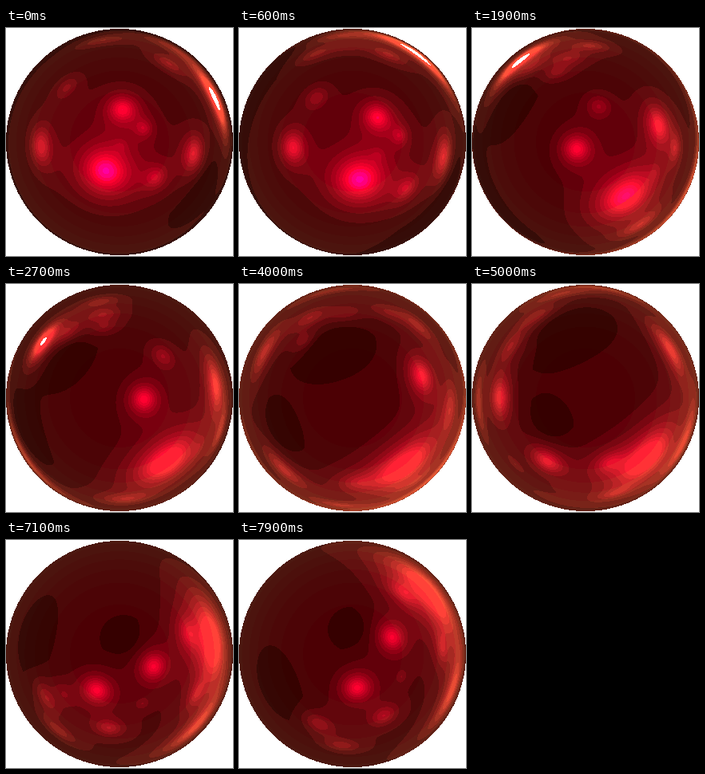
An HTML page with a canvas for the animation above (8000 ms loop, 284 px wide and 286 px high).

```html
<!DOCTYPE html>
<html lang="en">
<head>
<meta charset="utf-8">
<title>Red sphere</title>
<style>
html, body { margin: 0; width: 100%; height: 100%; overflow: hidden; background: #fff; }
canvas { display: block; width: 284px; height: 286px; }
</style>
</head>
<body>
<canvas id="stage" width="284" height="286"></canvas>
<script>
const W = 284, H = 286, R = 142, CX = 141.5, CY = 142.5;
const LOOP = 8000, STEP = 100, LIFE = 4000;
const SPIN = .77; // radians per second

const ctx = document.getElementById('stage').getContext('2d');
const img = ctx.createImageData(W, H);

const dot = (a, b) => a[0] * b[0] + a[1] * b[1] + a[2] * b[2];

// Spin axis, drifting from upright towards the viewer
const AXES = [[-.35, .94, .03], [.1, .97, .2], [.46, .87, -.1], [.65, .66, -.37], [.56, .35, -.74], [.19, .19, -.96]];

function axisAt(t) {
  const k = Math.max(0, Math.min(AXES.length - 1.001, (t - 600) / 1400));
  const i = Math.floor(k);
  const a = AXES[i].map((v, j) => v + (AXES[i + 1][j] - v) * (k - i));
  const len = Math.hypot(...a);
  return a.map(v => v / len);
}

function rotate(v, a, angle) {
  const c = Math.cos(angle), s = Math.sin(angle), k = dot(a, v) * (1 - c);
  return [
    v[0] * c + (a[1] * v[2] - a[2] * v[1]) * s + a[0] * k,
    v[1] * c + (a[2] * v[0] - a[0] * v[2]) * s + a[1] * k,
    v[2] * c + (a[0] * v[1] - a[1] * v[0]) * s + a[2] * k
  ];
}

// Turned basis of the surroundings at every step of the loop
const frames = [[[1, 0, 0], [0, 1, 0], [0, 0, 1]]];
for (let t = 0; t < LOOP; t += STEP) {
  const axis = axisAt(t + STEP / 2);
  frames.push(frames[frames.length - 1].map(v => rotate(v, axis, SPIN * STEP / 1000)));
}

// Direction mirrored by the ball at a stage point
function mirror(x, y) {
  const nx = (x - CX) / R, ny = (y - CY) / R;
  const nz = Math.sqrt(Math.max(0, 1 - nx * nx - ny * ny));
  return [2 * nz * nx, 2 * nz * ny, 2 * nz * nz - 1];
}

// A light is fixed in the surroundings by the point where it is seen at one time
const lights = [];
function light(size, power, time, x, y, life = LIFE) {
  const dir = mirror(x, y);
  const body = frames[time / STEP].map(e => dot(e, dir));
  lights.push({ size, power, time, life, body });
}

light(.5, 1.35, 4000, 206, 228, LOOP * 2);
light(.25, .6, 0, 186, 187);
light(.3, 1, 1200, 201, 118);
light(.19, .5, 1200, 227, 141);
light(.14, .2, 1200, 201, 170);
light(.28, .85, 0, 234, 157);
light(.29, 1, 2700, 172, 144);
light(.25, .45, 2700, 196, 90);
light(.18, 2.6, 0, 261, 88);
light(.22, .45, 0, 203, 44);
light(.22, .35, 0, 120, 15);
light(.25, .4, 1200, 85, 28);
light(.25, .4, 4000, 88, 42);
light(.29, 1, 7100, 113, 188);
light(.28, .95, 7100, 184, 158);
light(.28, .6, 7100, 228, 117);
light(.24, .55, 7100, 128, 235);
light(.26, .45, 7100, 50, 197);
light(.13, .25, 7100, 170, 205);
light(.3, .8, 7100, 238, 232);
light(.2, .45, 7100, 238, 192);
light(.24, .4, 7100, 65, 238);

// Dark patches
light(.36, -.22, 0, 245, 200);
light(.4, -.22, 2700, 75, 90);
light(.34, -.2, 5900, 130, 155);
light(.4, -.2, 7100, 35, 120);

const pixels = [];
for (let y = 0; y < H; y++) {
  for (let x = 0; x < W; x++) {
    const r = Math.hypot(x - CX, y - CY) / R;
    if (r > 1) continue;
    pixels.push({ at: (y * W + x) * 4, r, rim: Math.round(r ** 3 * 6) / 6, d: mirror(x, y) });
  }
}

function pose(l, t) {
  const a = l.power * Math.max(0, 1 - ((t - l.time) / l.life) ** 4);
  if (!a) return null;
  const f = frames[t / STEP];
  const [x, y, z] = [0, 1, 2].map(i => l.body[0] * f[0][i] + l.body[1] * f[1][i] + l.body[2] * f[2][i]);
  const k = 1 / (l.size * l.size);
  return { x, y, z, a, core: k, halo: k / 4 };
}

function shade(p, v) {
  const q = Math.max(-.125, Math.floor(v * 8 + .4) / 8);
  const c = Math.min(q, 1), w = p.rim, px = img.data;
  const white = v > 1.9 && p.r > .8;
  const hot = Math.max(0, q - 1) * 300 * Math.max(0, 1 - 3 * w);
  px[p.at] = white ? 255 : 76 + 180 * c;
  px[p.at + 1] = white ? 255 : w * (24 + 75 * c);
  px[p.at + 2] = white ? 255 : 4 + 44 * c + 12 * w + hot;
  px[p.at + 3] = 255;
}

function draw(t) {
  const lit = lights.map(l => pose(l, t)).filter(Boolean);
  for (const p of pixels) {
    const [x, y, z] = p.d;
    let glow = 0, dark = 0;
    for (const l of lit) {
      const dd = 2 - 2 * (x * l.x + y * l.y + z * l.z);
      const core = 1 + dd * l.core, halo = 1 + dd * l.halo;
      const v = l.a * (.85 / (core * core) + .2 / (halo * halo));
      if (l.a > 0) glow += v; else dark += v;
    }
    shade(p, Math.max(0, glow - .1) + dark);
  }
  ctx.putImageData(img, 0, 0);
}

let shown = -1;
const start = performance.now();
function tick() {
  const t = Math.floor(((performance.now() - start) % LOOP) / STEP) * STEP;
  if (t !== shown) draw(shown = t);
  requestAnimationFrame(tick);
}
tick();
</script>
</body>
</html>
```
